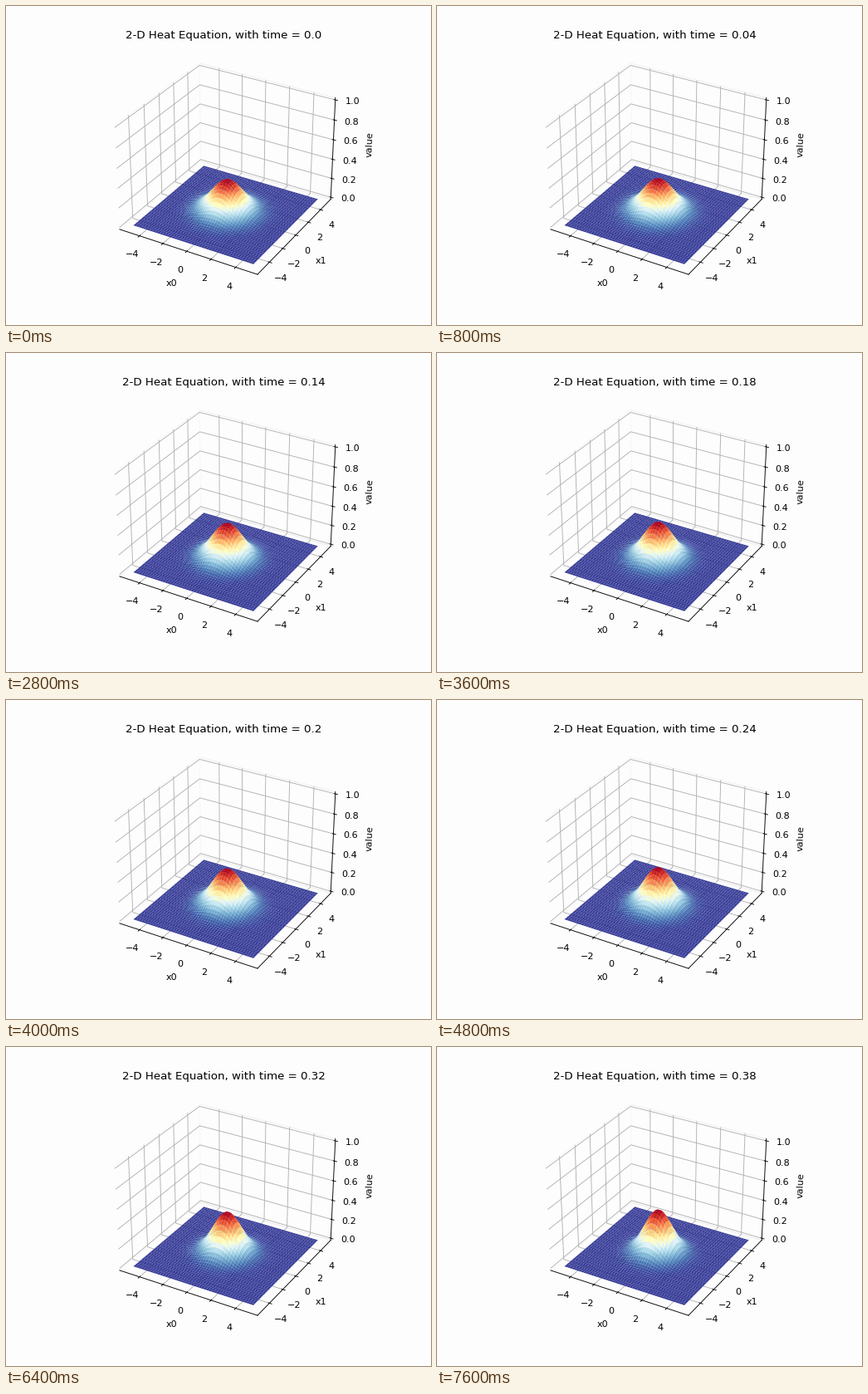
Write a matplotlib script that moves like this. It is 512 px wide and 384 px high and loops after 8000 ms.

```python
import numpy as np
import matplotlib.pyplot as plt
from matplotlib.animation import FuncAnimation

FRAMES = 20
INTERVAL = 400
TIME_STEP = 0.02
END_TIME = 1.0
PAPER = "#fdfdfd"
MARGIN = 1 / 48  # room between the data limits and the edge of the box

plt.rcParams["font.family"] = "DejaVu Sans"

fig = plt.figure(figsize=(6.4, 4.8), dpi=80, facecolor=PAPER)
ax = fig.add_subplot(projection="3d", facecolor=PAPER)

axis_points = np.linspace(-5, 5, 50)
x0, x1 = np.meshgrid(axis_points, axis_points)


def heat(time):
    """Gaussian bump that sharpens until it reaches height 1 at END_TIME."""
    spread = 1 + 2 * (END_TIME - time)
    return np.exp(-(x0**2 + x1**2) / spread) / spread


def padded(low, high):
    pad = (high - low) * MARGIN
    return low - pad, high + pad


ax.set_xlim(*padded(-5.5, 5.5))
ax.set_ylim(*padded(-5.5, 5.5))
ax.set_zlim(*padded(0, 1))
ax.set_xticks(range(-4, 5, 2))
ax.set_yticks(range(-4, 5, 2))
ax.set_zticks(np.linspace(0, 1, 6))
# Setting ticks may widen the view, so the limits are fixed once more.
ax.set_xlim(*padded(-5.5, 5.5))
ax.set_ylim(*padded(-5.5, 5.5))
ax.set_zlim(*padded(0, 1))
ax.set_xlabel("x0")
ax.set_ylabel("x1")
ax.set_zlabel("value")
for axis in (ax.xaxis, ax.yaxis, ax.zaxis):
    axis.pane.fill = False

surfaces = []


def draw(frame):
    while surfaces:
        surfaces.pop().remove()
    time = round(frame * TIME_STEP, 2)
    surfaces.append(ax.plot_surface(x0, x1, heat(time), cmap="RdYlBu_r"))
    ax.set_title(f"2-D Heat Equation, with time = {time}")
    return surfaces


def start():
    return draw(0)


animation = FuncAnimation(fig, draw, frames=FRAMES, init_func=start,
                          interval=INTERVAL, repeat=True, repeat_delay=0)
plt.show()
```
